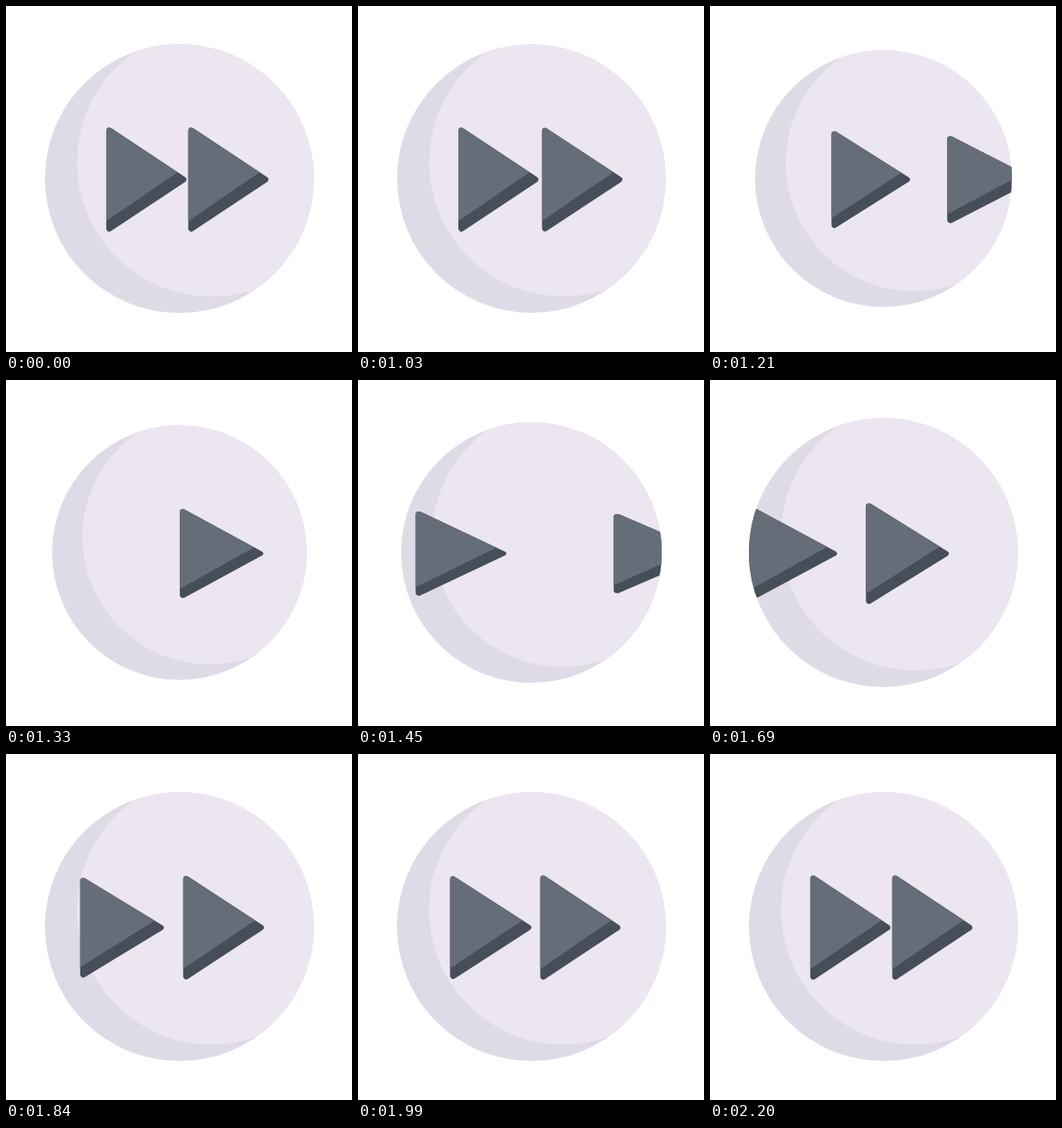
These frames come from a looping animation (400x400 px, 2230 ms). An HTML page:

```html
<!DOCTYPE html>
<html lang="en">
<head>
<meta charset="utf-8">
<title>Fast forward</title>
<style>
  html, body { margin: 0; width: 100%; height: 100%; overflow: hidden; background: #fff; }
  svg { display: block; width: 100%; height: 100%; }
  .base { fill: #dfdbe6; }
  .face { fill: #ebe6f0; }
  .arrow path { stroke-width: 7; stroke-linejoin: round; }
  .shade { fill: #464e59; stroke: #464e59; }
  .light { fill: #656d78; stroke: #656d78; }
</style>
</head>
<body>
<svg viewBox="0 0 400 400">
  <defs>
    <clipPath id="disc"><circle r="155.5"/></clipPath>
    <clipPath id="upper"><path d="M-60 57.4L60-24.8V-80H-60Z"/></clipPath>
    <g id="arrow" class="arrow">
      <path class="shade" d="M-42.8-56.7L42.8 0L-42.8 56.7Z"/>
      <g clip-path="url(#upper)">
        <path class="light" d="M-42.8-56.7L42.8 0L-42.8 56.7Z"/>
      </g>
    </g>
  </defs>
  <g id="button">
    <circle class="base" r="155.5"/>
    <g clip-path="url(#disc)">
      <circle class="face" cx="37" cy="-19" r="155.5"/>
      <use id="back" href="#arrow"/>
      <use id="front" href="#arrow"/>
    </g>
  </g>
</svg>
<script>
const LOOP = 2230, START = 1030, STEP = 30;
const EDGE = 230; // arrow centre when it is outside the disc

const button = document.getElementById('button');
const arrows = [
  { el: document.getElementById('back'), home: -38.3, leave: 1105, leaveTime: 415,
    enter: 1512, enterTime: 703, stretchIn: 0.3 },
  { el: document.getElementById('front'), home: 56.5, leave: 1000, leaveTime: 341,
    enter: 1349, enterTime: 625, stretchIn: 0.34 },
];

const clamp = v => Math.min(1, Math.max(0, v));
const progress = (t, from, time) => clamp((t - from) / time);
const sine = u => (1 - Math.cos(Math.PI * u)) / 2;
const easeIn = u => Math.pow(u, 1.79);

function bezier(x1, y1, x2, y2) {
  const at = (a, b, s) => 3 * a * s * (1 - s) ** 2 + 3 * b * s * s * (1 - s) + s ** 3;
  return u => {
    if (u <= 0 || u >= 1) return clamp(u);
    let lo = 0, hi = 1;
    for (let i = 0; i < 30; i++) {
      const mid = (lo + hi) / 2;
      if (at(x1, x2, mid) < u) lo = mid; else hi = mid;
    }
    return at(y1, y2, lo);
  };
}
const settle = bezier(0.096, 0.6, 0.41, 1);

function placeArrow(a, t) {
  let far, x, stretch;
  if (t < a.enter) {
    far = easeIn(progress(t, a.leave, a.leaveTime));
    x = a.home + (EDGE - a.home) * far;
    stretch = 0.3 * far;
  } else {
    far = 1 - settle(progress(t, a.enter, a.enterTime));
    x = a.home - (EDGE + a.home) * far;
    stretch = a.stretchIn * far;
  }
  a.el.setAttribute('transform',
    `translate(${x} 1.2) scale(${1 + stretch} ${1 - stretch})`);
}

function draw(time) {
  const t = time < START ? 0 : START + Math.floor((time - START) / STEP) * STEP;
  const press = sine(progress(t, 1000, 290)) - sine(progress(t, 1290, 350));
  button.setAttribute('transform', `translate(200.5 199.5) scale(${1 - 0.055 * press})`);
  for (const a of arrows) placeArrow(a, t);
}

const origin = performance.now();
function tick() {
  draw((performance.now() - origin) % LOOP);
  requestAnimationFrame(tick);
}
tick();
</script>
</body>
</html>
```
